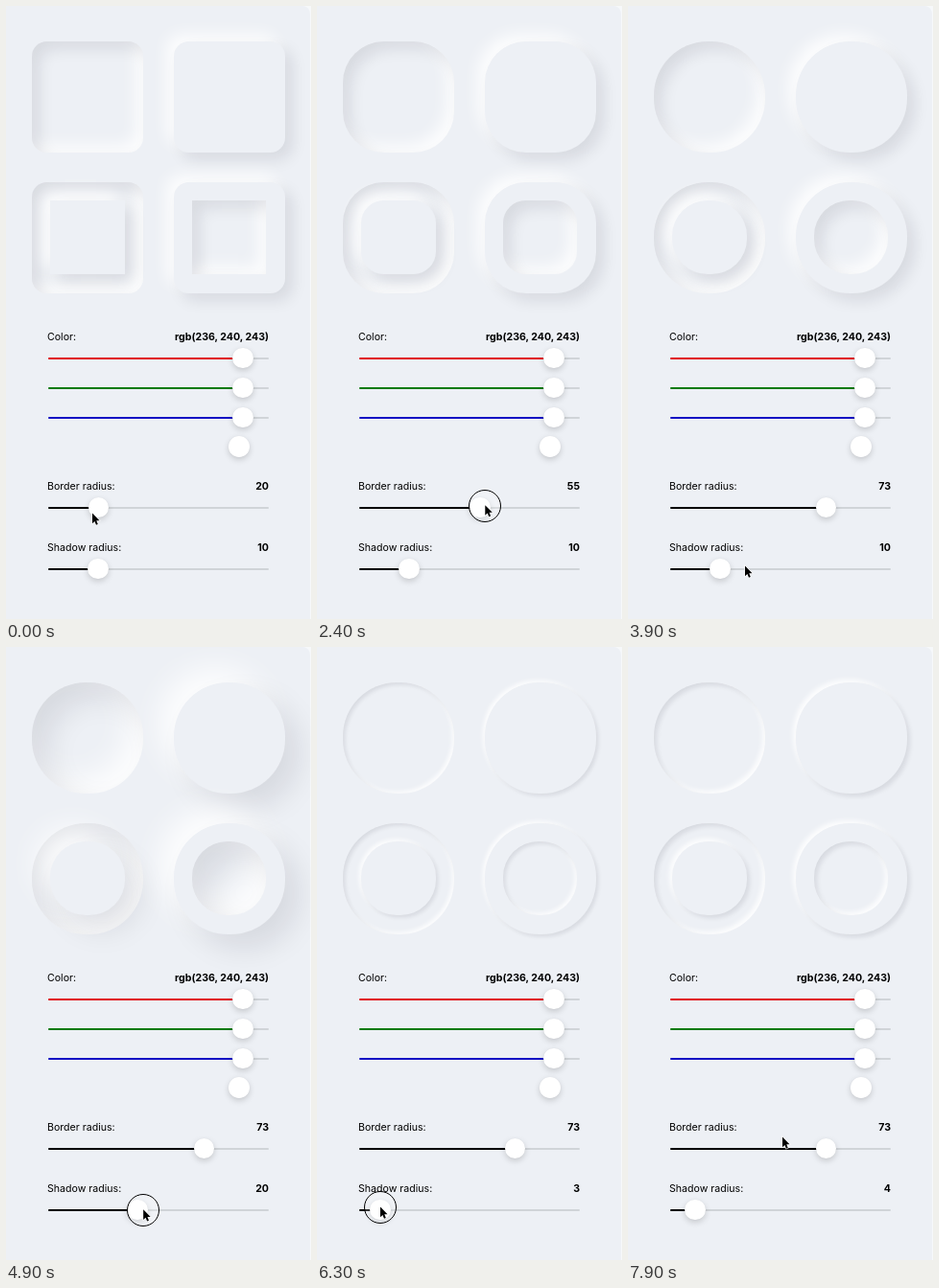
Recreate the animation shown at these times as an HTML page. Size 318 px wide and 640 px high, loop 8 s.

```html
<!DOCTYPE html>
<html lang="en">
<head>
<meta charset="utf-8">
<title>Soft UI sliders</title>
<style>
html, body { margin: 0; width: 100%; height: 100%; overflow: hidden; background: #f6f8fa; }
#app {
  --bg: rgb(237, 240, 245); --dark: rgba(10, 15, 30, .095); --light: rgba(255, 255, 255, .85);
  position: relative; width: 317px; height: 640px; border-radius: 0 8px 0 0;
  background: var(--bg); font: 10.6px/14px Inter, sans-serif; color: #000;
}
#app div, #app svg { position: absolute; box-sizing: border-box; }
.box { background: var(--bg); }
.up { box-shadow: var(--d) var(--d) var(--b) var(--dark), var(--n) var(--n) var(--b) var(--light); }
.down { box-shadow: inset var(--d) var(--d) var(--b) var(--dark), inset var(--n) var(--n) var(--b) var(--light); }
.outer { width: 116px; height: 116px; border-radius: var(--r); }
.inner { left: 19.3px; top: 19.3px; width: 77.4px; height: 77.4px; border-radius: var(--ri); }
.label { left: 43px; white-space: nowrap; }
.value { right: 43px; white-space: nowrap; font-weight: 700; }
.track, .fill { left: 44px; height: 2px; border-radius: 1px; }
.track { width: 230px; background: #d0d4d8; }
.thumb {
  width: 21.5px; height: 21.5px; border-radius: 50%; background: #fff;
  box-shadow: 0 2.5px 6px rgba(0, 0, 0, .17), 0 0 1px rgba(0, 0, 0, .06);
}
#ring { width: 34px; height: 34px; border: 1.4px solid #000; border-radius: 50%; background: rgba(255, 255, 255, .2); }
#cursor { left: 0; top: 0; width: 12px; height: 16px; overflow: visible; }
</style>
</head>
<body>
<div id="app"></div>
<script>
const LOOP = 8000, STEP = 100, LAG = 70;
const PT = 0.773, MIN_X = 54.2, RANGE = 209;
const app = document.getElementById('app');

// Pointer stops: time, x, y; the thumbs follow the pointer during the two drags
const path = [
  [0, 90, 529], [500, 96.3, 522], [1090, 96.3, 522], [3110, 206.6, 520], [3400, 206.6, 520],
  [3900, 122, 584], [4250, 96.2, 586], [5230, 160, 587], [6260, 66, 584], [7000, 66, 584],
  [7500, 70, 583], [7800, 80, 577], [7900, 161, 511]
];
const radiusDrag = [1090, 3110], shadowDrag = [4250, 7500];
const presses = [[1000, 3400], [4200, 7700]];

const px = v => v + 'px';
const clamp = (v, [lo, hi]) => Math.min(hi, Math.max(lo, v));
const ease = p => p * p * (3 - 2 * p);

function pointer(t) {
  const i = path.findIndex(stop => stop[0] > t);
  const [t1, x1, y1] = path.at(i < 0 ? -1 : i);
  const [t0, x0, y0] = path.at(i < 0 ? -2 : i - 1);
  const p = ease(clamp((t - t0) / (t1 - t0), [0, 1]));
  return [x0 + (x1 - x0) * p, y0 + (y1 - y0) * p];
}
const dragX = (t, span) => pointer(clamp(t - LAG, span))[0];

function add(cls, style = {}, parent = app, text = '') {
  const el = document.createElement('div');
  el.className = cls;
  el.textContent = text;
  Object.assign(el.style, style);
  return parent.appendChild(el);
}

function pane(x, y, dir, innerDir) {
  const el = add('box outer ' + dir, { left: px(x), top: px(y) });
  if (innerDir) add('box inner ' + innerDir, {}, el);
}

function thumb(x, y) {
  return add('thumb', { left: px(x - 10.75), top: px(y - 10.75) });
}

function slider(y, color, x) {
  add('track', { top: px(y) });
  const fill = add('fill', { top: px(y), background: color });
  const knob = thumb(x, y + 0.4);
  const set = cx => {
    fill.style.width = px(cx - 44);
    knob.style.left = px(cx - 10.75);
  };
  set(x);
  return set;
}

function caption(y, name, value) {
  add('label', { top: px(y) }, app, name);
  return add('value', { top: px(y) }, app, value);
}

pane(27, 37, 'down');
pane(174.5, 37, 'up');
pane(27, 183.7, 'down', 'up');
pane(174.5, 183.7, 'up', 'down');

caption(339, 'Color:', 'rgb(236, 240, 243)');
['#e0070f', '#087a0c', '#1410c4'].forEach((c, i) => slider(367 + i * 31, c, 246.8));
thumb(243, 460);

const radiusText = caption(495, 'Border radius:', '20');
const setRadius = slider(523, '#000', 96);
const shadowText = caption(559, 'Shadow radius:', '10');
const setShadow = slider(587, '#000', 96);

const ring = add('');
ring.id = 'ring';
app.insertAdjacentHTML('beforeend',
  '<svg id="cursor"><path d="M0 0V10.6L2.4 8.4L4 12.2L5.8 11.4L4.3 7.7H7.5Z" stroke="#fff" stroke-width="1.2" paint-order="stroke"/></svg>');
const cursor = document.getElementById('cursor');

function draw(t) {
  const [x, y] = pointer(t);
  const radiusX = dragX(t, radiusDrag), shadowX = dragX(t, shadowDrag);
  const r = (radiusX - MIN_X) / RANGE * 100;
  const s = (shadowX - MIN_X) / RANGE * 50;
  const vars = { '--r': r, '--ri': Math.max(0, r - 25), '--d': s, '--n': -s, '--b': 2 * s };
  for (const name in vars) app.style.setProperty(name, px(vars[name] * PT));
  setRadius(radiusX);
  setShadow(shadowX);
  radiusText.textContent = Math.round(r);
  shadowText.textContent = Math.round(s);
  cursor.style.transform = `translate(${x}px, ${y + 0.6}px)`;
  ring.style.left = px(x - 17);
  ring.style.top = px(y - 16);
  ring.hidden = !presses.some(([a, b]) => t >= a && t < b);
}

const start = performance.now();
function tick() {
  const t = (performance.now() - start) % LOOP;
  draw(Math.floor(t / STEP) * STEP);
  requestAnimationFrame(tick);
}
tick();
</script>
</body>
</html>
```
